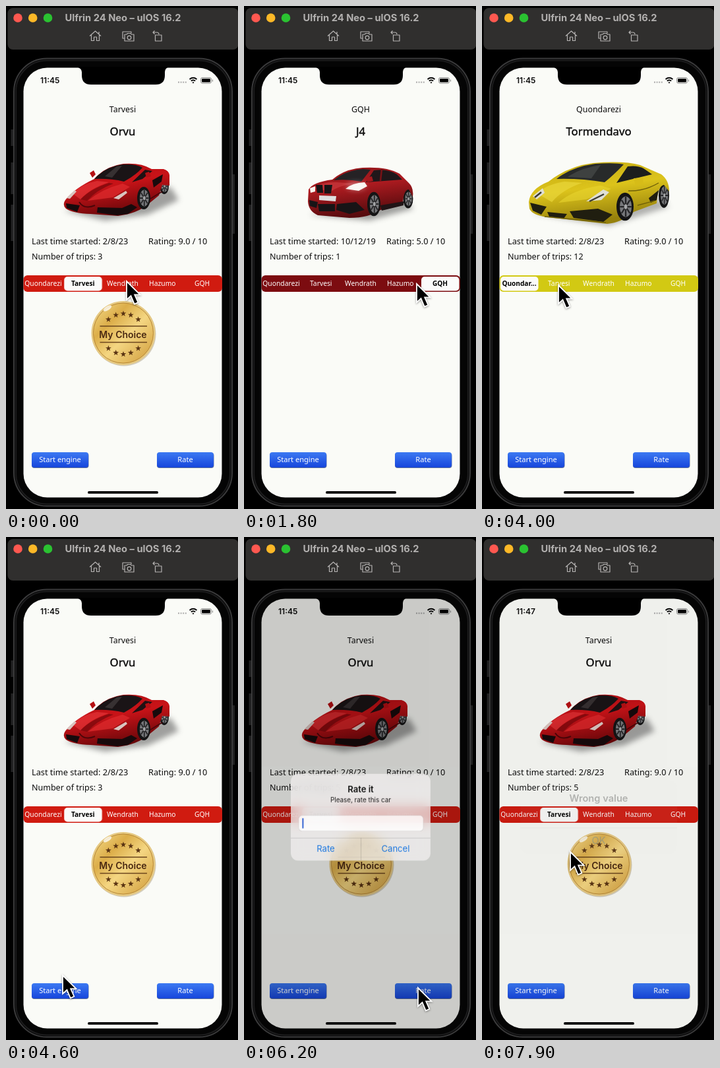
Recreate the animation shown at these times as an HTML page. Size 352 by 762 pixels, loop 8000 ms.

```html
<!DOCTYPE html>
<html lang="en">
<head>
<meta charset="utf-8">
<title>Car collection</title>
<style>
html, body { margin: 0; width: 100%; height: 100%; overflow: hidden; background: #000; }
body { position: relative; }
svg { position: absolute; left: 0; top: 0; }
text { font-family: "Noto Sans", sans-serif; font-size: 12.75px; fill: #0c0c0c; }
.ui, .alert { font-family: Inter, Roboto, sans-serif; }
.mid { text-anchor: middle; }
.seg text { font-size: 10.3px; fill: #fff; }
.seg .on { fill: #000; font-weight: 600; font-size: 10.1px; }
.btn text { font-size: 11.1px; fill: #fff; }
.car { visibility: hidden; }
.shown { visibility: visible; }
#model { font-size: 16.8px; stroke: #0c0c0c; stroke-width: .4px; }

#thumb { animation: slide 8s infinite; }
#start > * { animation: start 8s linear infinite; }
#rate > * { animation: rate 8s linear infinite; }
#cursor { animation: point 8s ease-in-out infinite; }
.dim {
  position: absolute; left: 26px; top: 93px; width: 302px; height: 652px;
  border-radius: 36px; background: #000; opacity: 0; animation: dim 8s linear infinite;
}
.alert {
  position: absolute; left: 73px; width: 208px; border-radius: 11px; opacity: 0; text-align: center;
}
.alert > * { position: absolute; left: 0; right: 0; line-height: 16px; }
.alert b { font-weight: 600; font-size: 12.8px; color: #000; }
.alert p { margin: 0; font-size: 9.7px; color: #111; }
.alert a { font-size: 12.8px; color: #0b6fe3; }
.alert hr { margin: 0; border: 0; height: 1px; background: rgba(60, 60, 67, .18); }
#ask {
  top: 360px; height: 129px; background: rgba(243, 241, 241, .8); backdrop-filter: blur(9px);
  animation: ask 8s linear infinite;
}
#wrong { top: 375px; height: 98px; animation: wrong 8s linear infinite; }
.field {
  left: 12px; right: 11px; top: 62px; height: 23px; border-radius: 5px;
  background: #fff; box-shadow: 0 0 0 .5px #d0d0d0;
}
.field span, .field i { position: absolute; left: 5px; top: 4px; font-size: 10.2px; color: #111; }
.field i { width: 1.5px; height: 15px; background: #2b62d9; }

@keyframes slide {
  0%, 15% { transform: translateX(60.25px); }
  18%, 30% { transform: translateX(241px); }
  33%, 50.5% { transform: translateX(0); }
  53.5%, 100% { transform: translateX(60.25px); }
}
@keyframes start {
  0%, 39.2%, 43.5%, 59.3%, 62.5%, 64.3%, 67.5%, 100% { opacity: 1; }
  39.3%, 41.2%, 59.4%, 60.4%, 64.4%, 65.4% { opacity: .26; }
}
@keyframes rate {
  0%, 74.2%, 77.2%, 100% { opacity: 1; }
  74.3%, 75.4% { opacity: .26; }
}
@keyframes point {
  0% { transform: translate(183px, 417px); }
  13%, 17.5% { transform: translate(292px, 423px); animation-timing-function: linear; }
  22.5% { transform: translate(262px, 421px); }
  28.5%, 31.5% { transform: translate(62px, 420px); }
  38%, 42% { transform: translate(81px, 697px); }
  49%, 52% { transform: translate(116px, 423px); animation-timing-function: linear; }
  57.5% { transform: translate(86px, 664px); }
  59%, 66.5% { transform: translate(83px, 686px); }
  73.5%, 86% { transform: translate(264px, 683px); }
  92.5%, 100% { transform: translate(134px, 477px); }
}
@keyframes dim {
  0%, 75.6%, 97.7% { opacity: 0; }
  77.5% { opacity: .19; }
  79%, 95.6% { opacity: .2; }
  98.75% { opacity: .04; }
  100% { opacity: .17; }
}
@keyframes ask {
  0%, 75.6% { opacity: 0; transform: scale(1.2); }
  77.5% { opacity: .92; transform: scale(1.019); }
  79.5%, 95.6% { opacity: 1; transform: none; }
  97.7%, 100% { opacity: 0; transform: none; }
}
@keyframes wrong {
  0%, 97.75% { opacity: 0; transform: scale(1.2); background: rgba(243, 241, 241, 0); }
  98.75% { opacity: .25; transform: scale(1.146); background: rgba(243, 241, 241, .15); }
  100% { opacity: .85; transform: scale(1.03); background: rgba(243, 241, 241, .9); }
}
</style>
</head>
<body>
<svg width="352" height="762" viewBox="0 0 352 762">
  <defs>
    <linearGradient id="blue" x2="0" y2="1">
      <stop stop-color="#3c79f2"/><stop offset="1" stop-color="#1746dc"/>
    </linearGradient>
    <linearGradient id="gold" x2="1" y2="1">
      <stop stop-color="#f6dc8c"/><stop offset=".3" stop-color="#dcae4a"/>
      <stop offset=".55" stop-color="#f4d682"/><stop offset="1" stop-color="#cf9a38"/>
    </linearGradient>
    <linearGradient id="red" x2=".4" y2="1">
      <stop stop-color="#a90d11"/><stop offset=".5" stop-color="#c91318"/><stop offset="1" stop-color="#6a070a"/>
    </linearGradient>
    <linearGradient id="wine" x2=".3" y2="1">
      <stop stop-color="#8c1519"/><stop offset=".45" stop-color="#ad1b20"/><stop offset="1" stop-color="#570b0e"/>
    </linearGradient>
    <linearGradient id="yellow" x2=".3" y2="1">
      <stop stop-color="#c3aa12"/><stop offset=".5" stop-color="#dcc31b"/><stop offset="1" stop-color="#96810c"/>
    </linearGradient>
    <filter id="soft" x="-30%" y="-80%" width="160%" height="260%"><feGaussianBlur stdDeviation="4"/></filter>
    <g id="wheel">
      <ellipse rx="10" ry="17" fill="#141415"/>
      <ellipse cx=".8" rx="7" ry="12.5" fill="#77787b"/>
      <path d="M.8-12V12M-6 0H7.5M-4-8L5.6 8M-4 8L5.6-8" stroke="#252527" stroke-width="1.8"/>
      <ellipse cx=".8" rx="1.8" ry="3" fill="#a5a6a8"/>
    </g>
    <path id="star" d="M0-4.6L1.1-1.5 4.4-1.4 1.8.6 2.7 3.7 0 1.9-2.7 3.7-1.8.6-4.4-1.4-1.1-1.5Z" fill="#5a3413"/>
  </defs>

  <!-- window bar -->
  <rect x="2.5" y="3" width="350" height="63" rx="8" fill="#302f2e"/>
  <circle cx="18" cy="18" r="6.8" fill="#fe5850"/>
  <circle cx="40.7" cy="18" r="6.8" fill="#fcb827"/>
  <circle cx="63.5" cy="18" r="6.8" fill="#2ac231"/>
  <text class="ui" x="89.500" y="22.5" style="font-size:14.7px;font-weight:700;fill:#b2b0af">Ulfrin 24 Neo – ulOS 16.2</text>
  <g fill="none" stroke="#b5b3b2" stroke-width="1.2" stroke-linejoin="round">
    <path d="M127 45.5L135.5 38 144 45.5M129.5 44V52.5H133.5V47H137.5V52.5H141.5V44M141 42V39"/>
    <path d="M179.5 49H177V39H190V41M180 43H183L184.5 41.5H189L190.5 43H194V53H180Z"/>
    <circle cx="187" cy="48" r="2.8"/>
    <path d="M226.5 44H236V53H226.5ZM223 40H229Q232 40 232 43M225.5 37.5L223 40 225.5 42.5"/>
  </g>

  <!-- phone -->
  <path d="M9.5 187V212M9.5 237V285M9.5 301V356M345 255V345" stroke="#222223" stroke-width="4"/>
  <rect x="12" y="79.5" width="331" height="678" rx="50" fill="#050505" stroke="#3b3b3c" stroke-width="2"/>
  <rect x="15" y="82.5" width="325" height="672" rx="47" fill="none" stroke="#1c1c1d" stroke-width="2"/>
  <rect x="26.5" y="93.5" width="301" height="651" rx="36" fill="#fafbf7"/>
  <path d="M106 92H248Q241 94 241 100V105Q241 119 227 119H129Q115 119 115 105V100Q115 94 106 92Z"/>
  <text class="ui" id="clock" x="52" y="117" style="font-size:12px;font-weight:600"></text>
  <path d="M261 115.5H274" stroke="#aaa" stroke-width="2" stroke-dasharray="2 1.6"/>
  <g fill="none" stroke="#080808">
    <path d="M278.5 111Q284 106.5 289.5 111M280.8 113.5Q284 110.8 287.2 113.5" stroke-width="1.9"/>
    <circle cx="284" cy="116" r=".8"/>
    <rect x="295.5" y="108.5" width="16" height="8.5" rx="2.5" stroke="#888"/>
    <path d="M313.5 111.5V114.5" stroke="#888"/>
  </g>
  <rect x="297" y="110" width="13" height="5.5" rx="1.2"/>
  <rect x="124" y="735" width="107" height="3.8" rx="1.9"/>

  <!-- car details -->
  <text class="mid" id="make" x="177" y="161" style="font-size:12.4px"></text>
  <text class="mid" id="model" x="177" y="196"></text>
  <text id="last" x="39" y="361"></text>
  <text id="rating" x="216" y="361"></text>
  <text id="trips" x="39" y="384" style="font-size:12.5px"></text>

  <g class="car">
    <path d="M88 310L150 325 215 316 262 294 250 274 200 290Z" fill="#555" opacity=".55" filter="url(#soft)"/>
    <use href="#wheel" transform="translate(240 273) scale(.7)"/>
    <path d="M90 294Q104 276 134 262 150 243 178 239 205 237 221 247L239 247Q249 250 248 259V272L237 271 232 287 216 300Q200 314 170 318L128 315Q102 314 91 307 85 301 90 294Z" fill="url(#red)"/>
    <path d="M134 262Q150 244 176 240 198 239 207 245 196 257 179 266 158 261 134 262Z" fill="#1a1416"/>
    <path d="M150 258L168 243 176 242 161 260Z" fill="#4b4446" opacity=".6"/>
    <path d="M211 248L222 250 207 262 191 267Z" fill="#1f1113"/>
    <path d="M101 284Q116 269 138 265L156 267Q128 276 113 293Z" fill="#e83a3c" opacity=".6"/>
    <path d="M124 295Q146 277 177 269L188 274 162 290Z" fill="#df2a2d" opacity=".75"/>
    <path d="M113 293Q128 277 156 268L163 269Q137 279 123 295Z" fill="#7d090d" opacity=".8"/>
    <path d="M91 299L112 302 108 312 92 306ZM139 305L176 306 190 300 199 305 185 315 168 317 138 313ZM222 264L238 255 236 266 224 275Z" fill="#170a0c"/>
    <path d="M92 291L104 279 107 281 97 292ZM163 291L182 280 184 283 171 293Z" fill="#d9c5c0"/>
    <path d="M111 297Q119 309 135 302M219 292L237 281" fill="none" stroke="#4c0609" stroke-width="2"/>
    <path d="M127 253L133 249 136 255 131 260ZM211 253L217 251 220 258 213 260Z" fill="#b51014"/>
    <use href="#wheel" transform="translate(209 291)"/>
  </g>

  <g class="car">
    <path d="M99 316L190 325 257 307 246 296Z" fill="#444" opacity=".5" filter="url(#soft)"/>
    <use href="#wheel" transform="translate(249 292) scale(.75 .85)"/>
    <path d="M98 278Q104 267 134 263 152 247 180 245 217 243 236 254L250 268Q258 276 256 289L250 278Q242 278 241 300L207 309Q190 321 160 321L112 317Q98 311 97 296Z" fill="url(#wine)"/>
    <path d="M136 264Q154 249 181 247L192 248 178 266Q158 262 136 264Z" fill="#252225"/>
    <path d="M197 249Q218 246 232 255L240 263 185 267Z" fill="#20171a"/>
    <path d="M209 247L207 265" stroke="#791216" stroke-width="2.5"/>
    <path d="M103 276Q120 266 141 267L165 269Q142 273 132 281Z" fill="#cc3b3f" opacity=".65"/>
    <path d="M109 271H119L120 283H111ZM122 271H134L132 284H122ZM99 294L112 297 110 306 100 303ZM141 300L170 297 183 309 160 315 140 309ZM112 300H138V311H114Z" fill="#171416"/>
    <path d="M100 276L108 273 108 281 101 283ZM154 277Q164 268 183 267L187 273 174 280Z" fill="#f7f4ee"/>
    <ellipse cx="170" cy="273" rx="14" ry="5" fill="#fff" opacity=".5" filter="url(#soft)"/>
    <path d="M114 287L140 288 139 296 114 294Z" fill="#dedede"/>
    <path d="M207 302L242 296V302L209 310Z" fill="#201416"/>
    <path d="M185 260L194 258 196 265 187 267Z" fill="#a4191e"/>
    <use href="#wheel" transform="translate(197 300) scale(1 1.08)"/>
  </g>

  <g class="car">
    <path d="M76 314L192 333 284 304 265 290Z" fill="#666" opacity=".5" filter="url(#soft)"/>
    <use href="#wheel" transform="translate(276 287) scale(.8 1.1)"/>
    <path d="M71 297Q73 277 101 266 130 243 168 238 215 234 240 241L272 255Q284 264 284 281L276 271Q267 272 265 299L230 312Q212 328 190 330L100 320Q76 317 72 307Z" fill="url(#yellow)"/>
    <path d="M113 262Q135 244 172 239 202 237 215 240 200 256 186 267 150 261 113 262Z" fill="#282a2a"/>
    <path d="M130 259Q150 245 180 241L166 261Z" fill="#555856" opacity=".5"/>
    <path d="M221 243Q236 241 245 246L258 255 204 268Z" fill="#1c1e1d"/>
    <path d="M84 284Q98 270 125 266L152 268Q122 278 106 297Z" fill="#ecd93c" opacity=".65"/>
    <path d="M116 298Q138 278 180 272L196 277 158 293Z" fill="#ead52f" opacity=".6"/>
    <path d="M73 298L98 304 90 316 77 310ZM133 311L176 307 198 316 184 327 139 321ZM99 312L129 315 124 322 102 319ZM253 291L268 279 265 294 256 298Z" fill="#201e10"/>
    <path d="M77 288L92 276 95 283 83 293ZM158 296L184 278 193 282 181 294Z" fill="#dfdfd4"/>
    <path d="M80 290L90 282M163 296L185 285" stroke="#3b3b32" stroke-width="2.5"/>
    <path d="M222 280Q246 281 268 268M95 319L188 328M236 302L262 295" fill="none" stroke="#6e5f09" stroke-width="1.4"/>
    <path d="M230 261L244 260 245 269 233 272Z" fill="#d6bc18"/>
    <use href="#wheel" transform="translate(217 304) scale(1.3 1.25)"/>
  </g>

  <!-- segmented control -->
  <rect id="bar" x="26.5" y="408" width="301.5" height="25" rx="6"/>
  <rect id="thumb" x="28" y="410" width="57.5" height="21.5" rx="5" fill="#fbfbfa"/>
  <g class="seg mid" id="seg"></g>

  <g id="badge">
    <circle cx="179" cy="497" r="48.5" fill="#8a7a55" opacity=".35"/>
    <circle cx="178" cy="495.5" r="48.5" fill="#e6c982"/>
    <circle cx="178" cy="495.5" r="45.5" fill="url(#gold)" stroke="#b88733"/>
    <path d="M142.5 485H214M142.5 509.5H214" stroke="#6b451c" stroke-width="1.4"/>
    <ellipse cx="154" cy="458" rx="7" ry="3" fill="#fff" opacity=".75" transform="rotate(-32 154 458)"/>
    <text class="ui mid" x="177.5" y="502.5" style="font-size:14px;font-weight:600;fill:#4a2912">My Choice</text>
  </g>

  <g class="btn mid" id="start">
    <rect x="39" y="677" width="86.5" height="23" rx="4" fill="#5b6f9c" opacity=".7"/>
    <rect x="39" y="676" width="86" height="23" rx="4" fill="url(#blue)"/>
    <text x="82" y="691">Start engine</text>
  </g>
  <g class="btn mid" id="rate">
    <rect x="229" y="677" width="86.5" height="23" rx="4" fill="#5b6f9c" opacity=".7"/>
    <rect x="229" y="676" width="86" height="23" rx="4" fill="url(#blue)"/>
    <text x="272" y="691">Rate</text>
  </g>
</svg>

<div class="dim"></div>
<div class="alert" id="ask">
  <b style="top:15px">Rate it</b>
  <p style="top:31px">Please, rate this car</p>
  <div class="field"><span id="typed"></span><i id="caret"></i></div>
  <hr style="top:95px">
  <hr style="top:95px;left:104px;right:auto;width:1px;height:34px">
  <a style="top:104px;right:104px">Rate</a>
  <a style="top:104px;left:104px">Cancel</a>
</div>
<div class="alert" id="wrong">
  <b style="top:17px">Wrong value</b>
  <hr style="top:63px">
  <a style="top:73px">OK</a>
</div>

<svg width="352" height="762" viewBox="0 0 352 762">
  <path id="cursor" d="M0 0V28L6.5 22 11.8 34.5 17.3 32 12.2 20.3H20.5Z" stroke="#fff" stroke-width="1.8" style="filter:drop-shadow(0 1px 1.5px rgba(0,0,0,.4))"/>
</svg>

<script>
const LOOP = 8000;
const names = ['Quondarezi', 'Tarvesi', 'Wendrath', 'Hazumo', 'GQH'];
const sport = { seg: 1, art: 0, model: 'Orvu', last: '2/8/23', rating: '9.0', bar: '#d01b10' };
const suv = { seg: 4, art: 1, model: 'J4', last: '10/12/19', rating: '5.0', bar: '#7c0c10' };
const wedge = { seg: 0, art: 2, model: 'Tormendavo', last: '2/8/23', rating: '9.0', bar: '#d2c913' };

// [start time, value]; the last one reached applies
const cars = [[0, sport], [1200, suv], [2400, wedge], [4040, sport]];
const trips = [[0, 3], [1200, 1], [2400, 11], [3300, 12], [4040, 3], [4830, 4], [5230, 5]];
const typing = [[0, ''], [6700, '1'], [6900, '10'], [7100, '100']];
const clocks = [[0, '11:45'], [6600, '11:47']];

const $ = id => document.getElementById(id);
const at = (steps, t) => steps.filter(s => s[0] <= t).pop()[1];
const put = (id, value) => { if ($(id).textContent !== value) $(id).textContent = value; };

function add(parent, tag, attrs) {
  const el = document.createElementNS(parent.namespaceURI, tag);
  for (const k in attrs) el.setAttribute(k, attrs[k]);
  return parent.appendChild(el);
}

const labels = names.map((name, i) => add($('seg'), 'text', { x: 56.5 + 60.25 * i, y: 424.3 }));
for (let i = -2; i <= 2; i++) {
  const rise = 29.5 - 2.2 * i * i;
  for (const y of [495.5 - rise, 498 + rise]) {
    add($('badge'), 'use', { href: '#star', transform: `translate(${178 + 11.3 * i} ${y})` });
  }
}

const art = document.querySelectorAll('.car');
let shown;

function showCar(car) {
  if (car === shown) return;
  shown = car;
  put('make', names[car.seg]);
  put('model', car.model);
  put('last', 'Last time started: ' + car.last);
  put('rating', `Rating: ${car.rating} / 10`);
  $('bar').setAttribute('fill', car.bar);
  $('badge').style.display = car === sport ? '' : 'none';
  art.forEach((g, i) => g.classList.toggle('shown', i === car.art));
  labels.forEach((label, i) => {
    const on = i === car.seg;
    label.classList.toggle('on', on);
    label.textContent = on && names[i].length > 9 ? names[i].slice(0, 7) + '...' : names[i];
  });
}

let begin;
function draw(now) {
  begin ??= now;
  const t = (now - begin) % LOOP;
  showCar(at(cars, t));
  put('trips', 'Number of trips: ' + at(trips, t));
  put('clock', at(clocks, t));
  const typed = at(typing, t);
  put('typed', typed);
  $('caret').style.left = 5 + 6.3 * typed.length + 'px';
  $('caret').style.visibility = Math.floor((t - 6050) / 500) % 2 ? 'hidden' : '';
  requestAnimationFrame(draw);
}
requestAnimationFrame(draw);
</script>
</body>
</html>
```
